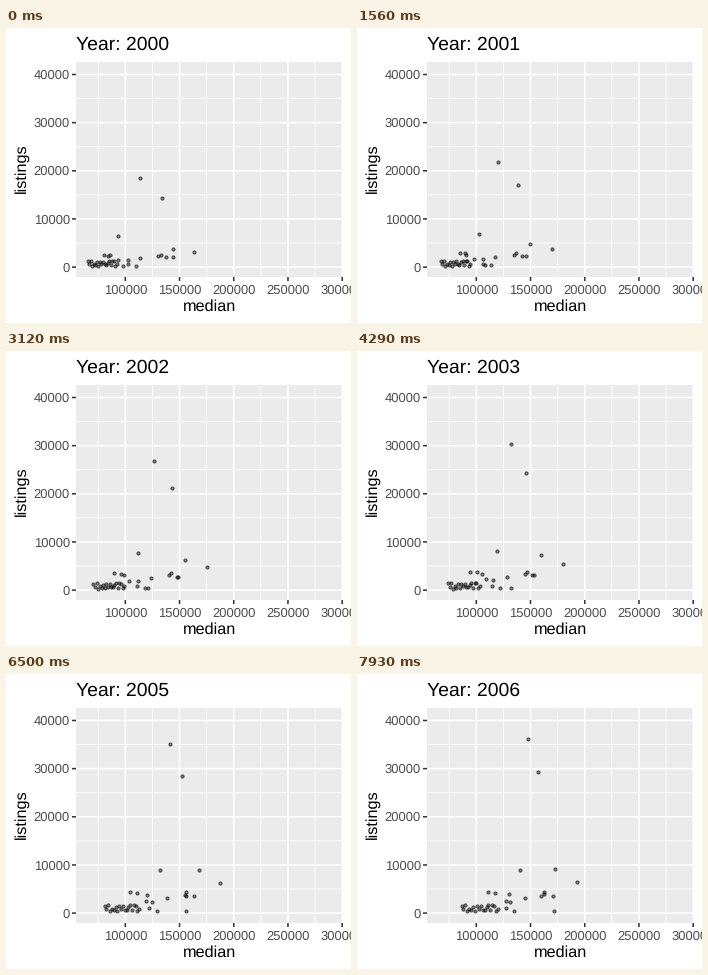
A matplotlib script that plays this animation: 345x295 px, repeating every 8 s.

```python
import numpy as np
import matplotlib.pyplot as plt
from matplotlib.animation import FuncAnimation
from matplotlib.patches import Rectangle

W, H, DPI = 345, 295, 64
FRAMES, LOOP_MS = 62, 8000
FRAMES_PER_YEAR = 10
PX = 72 / DPI       # one pixel in points
UNIT = 106 / 72     # theme points to pixels
LEFT, RIGHT, TOP, BOTTOM = 70, 337, 34, 249

plt.rcParams["font.family"] = "Liberation Sans"
plt.rcParams["text.hinting"] = "none"

# Thousands: price, listings, price gain, listings gain
LEADERS = np.array([
    [113.3, 18.5, 34.6, 17.7],
    [133.6, 14.3, 23.0, 15.0],
    [93.0, 6.4, 47.5, 2.6],
    [143.8, 3.7, 29.0, 5.5],
    [163.6, 3.2, 29.5, 3.3],
])

# Thousands: price, listings, price gain; listings share one growth rate
GROWTH = 0.7
MIDDLE = np.array([
    [137.8, 2.1, 33], [143.8, 2.1, 16], [133.2, 2.6, 29], [130.4, 2.3, 32],
    [113.3, 1.9, 32], [102.7, 1.4, 28], [93.0, 1.5, 34], [85.7, 2.5, 32],
    [80.6, 2.6, 30], [84.3, 2.3, 46], [110.1, 0.3, 25], [102.7, 0.6, 25],
    [98.1, 0.3, 74],
])
MIDDLE = np.column_stack([MIDDLE, MIDDLE[:, 1] * GROWTH])


def make_crowd(count=20):
    """Small markets: evenly spread prices, few listings."""
    rng = np.random.default_rng(4)
    price = np.linspace(65.4, 92.1, count)
    listings = 0.25 + 1.05 * rng.random(count) ** 1.7
    gain = np.linspace(21, 28, count)
    return np.column_stack([price, listings, gain, listings * 0.3])


GROUPS = [(LEADERS, 1.0), (MIDDLE, 1.25), (make_crowd(), 1.5)]


def px_x(price):
    return 119.3 + (price - 100000) * 54.22 / 50000


def px_y(listings):
    return 239.1 - listings * 48.15 / 10000


def positions(n):
    u = n / (FRAMES - 1)
    stock = np.sin(np.pi / 2 * u) ** 1.4
    pts = np.vstack([m[:, :2] + m[:, 2:] * [u ** power, stock]
                     for m, power in GROUPS]) * 1000
    return np.column_stack([px_x(pts[:, 0]), px_y(pts[:, 1])])


fig = plt.figure(figsize=(W / DPI, H / DPI), dpi=DPI, facecolor="white")
ax = fig.add_axes([0, 0, 1, 1])
ax.set(xlim=(0, W), ylim=(H, 0))
ax.axis("off")


def line(xs, ys, color, width, z):
    ax.plot(xs, ys, color=color, lw=width * PX, solid_capstyle="butt",
            snap=False, zorder=z)


def label(x, y, text, size, color="black", **kw):
    return ax.text(x, y, text, fontsize=size * UNIT * PX, color=color,
                   va="baseline", **kw)


ax.add_patch(Rectangle((LEFT, TOP), RIGHT - LEFT, BOTTOM - TOP,
                       fc="#ebebeb", ec="none", zorder=0))

for v in range(75000, 300001, 25000):
    major = v % 50000 == 0
    x = px_x(v)
    line([x, x], [TOP, BOTTOM], "white", 1.54 if major else .77, 1 + major)
    if major:
        line([x, x], [BOTTOM, BOTTOM + 4], "#333333", 1.54, 3)
        label(x, 265.5, str(v), 8.8, "#4d4d4d", ha="center")

for v in range(0, 40001, 5000):
    major = v % 10000 == 0
    y = px_y(v)
    line([LEFT, RIGHT], [y, y], "white", 1.54 if major else .77, 1 + major)
    if major:
        line([LEFT - 4, LEFT], [y, y], "#333333", 1.54, 3)
        label(63.7, y + 4.5, str(v), 8.8, "#4d4d4d", ha="right")

label((LEFT + RIGHT) / 2, 283, "median", 11, ha="center")
label(20, 140, "listings", 11, ha="center", rotation=90,
      rotation_mode="anchor")
title = label(LEFT, 22, "", 13.2)
dots = ax.scatter([], [], s=(3.3 * PX) ** 2, facecolors=(0, 0, 0, .5),
                  edgecolors=(0, 0, 0, .5), linewidths=.95 * PX, zorder=5)


def update(n):
    dots.set_offsets(positions(n))
    title.set_text(f"Year: {2000 + int(n / FRAMES_PER_YEAR + .5)}")
    return dots, title


anim = FuncAnimation(fig, update, frames=FRAMES, interval=LOOP_MS / FRAMES,
                     repeat=True, repeat_delay=0)
plt.show()
```
